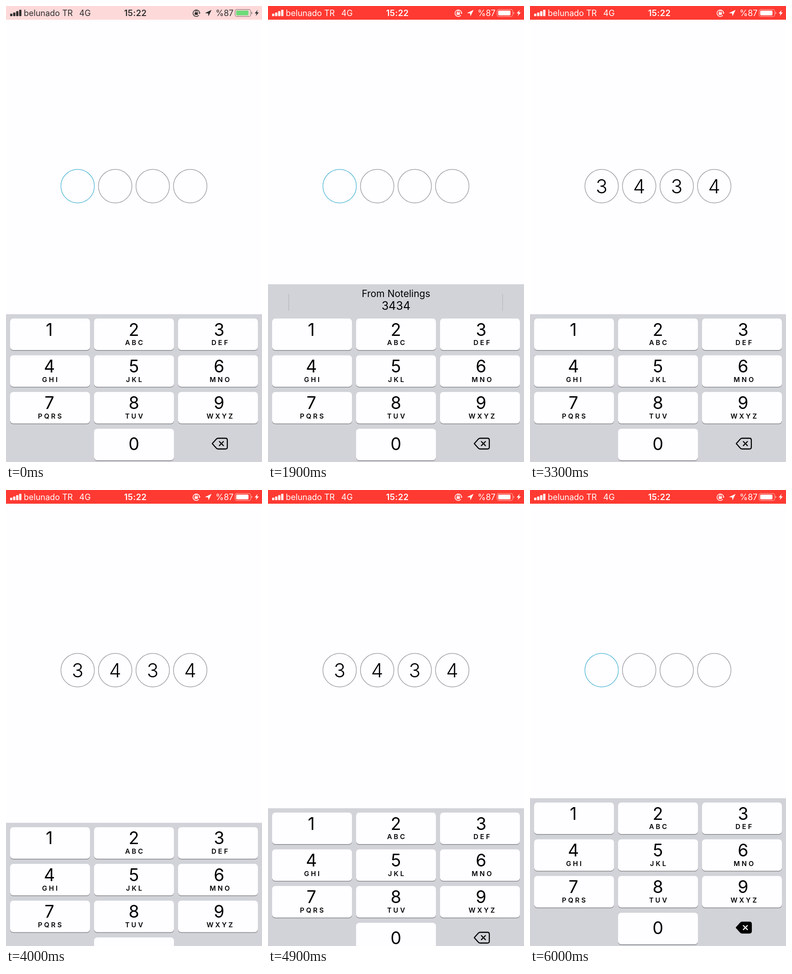
Recreate the animation shown at these times as an HTML page. Size 561x998 px, loop 6.2 s.

```html
<!DOCTYPE html>
<html lang="en">
<head>
<meta charset="utf-8">
<title>Passcode entry</title>
<style>
  html, body { margin: 0; width: 100%; height: 100%; overflow: hidden; background: #fefdff; }
  svg { display: block; width: 561px; height: 998px; font-family: Inter, Roboto, sans-serif; }
  .status text { font-size: 18px; }
  .status .clock { font-weight: 600; font-size: 18.5px; text-anchor: middle; letter-spacing: .3px; }
  .digit { font-size: 37.5px; text-anchor: middle; }
  .letters { font-size: 14.8px; font-weight: 600; letter-spacing: 3.9px; text-anchor: middle; }
  .code { font-size: 42px; font-weight: 300; text-anchor: middle; }
  .hint { text-anchor: middle; }
</style>
</head>
<body>
<svg id="stage" viewBox="0 0 561 998">
  <rect width="561" height="998" fill="#fefdff"/>
  <g id="fields"></g>
  <g id="keyboard">
    <rect y="674.5" width="561" height="324" fill="#d1d3d9"/>
    <g id="suggestion">
      <rect y="609" width="561" height="66" fill="#d1d3d9"/>
      <rect id="press" x="46" y="609" width="468" height="65" fill="#fefdff" opacity=".7"/>
      <path d="M45.5 630V667M514 630V667" stroke="#b6b8be" stroke-width="1.3"/>
      <text class="hint" x="280.5" y="637" font-size="21">From Notelings</text>
      <text class="hint" x="280.5" y="665" font-size="25">3434</text>
    </g>
    <g id="keys"></g>
    <g id="erase" stroke="#000" stroke-width="2.3" stroke-linejoin="round" stroke-linecap="round">
      <path id="eraseBody" d="M452 957.7L461.2 947.6Q462.8 946 465 946H481Q485 946 485 950V965.5Q485 969.5 481 969.5H465Q462.8 969.5 461.2 967.9Z"/>
      <path id="eraseCross" d="M467.6 953.3L476.4 962.1M476.4 953.3L467.6 962.1"/>
    </g>
  </g>
  <g id="darkStatus" class="status"></g>
  <g id="redStatus" class="status"></g>
</svg>
<script>
const $ = id => document.getElementById(id);
const LOOP = 6200, STEP = 100;
const CODE = '3434';

function statusBar(background, ink, charge) {
  const bars = [5.5, 8, 11, 14].map((h, i) =>
    `<rect x="${9 + i * 6.6}" y="${22.3 - h}" width="5" height="${h}" rx="1.3"/>`).join('');
  return `<rect width="561" height="30" fill="${background}"/>
    <g fill="${ink}">${bars}
      <text x="39" y="22">belunado TR</text>
      <text x="160.5" y="22">4G</text>
      <text class="clock" x="283.5" y="22">15:22</text>
      <text x="459.5" y="22">%87</text>
      <rect x="413.4" y="14" width="7" height="5.6" rx=".8"/>
      <path d="M421.6 14.5H426.4L424 17.6Z"/>
      <path d="M436 15.6L450.5 8.6L443.7 22.5L443 16.2Z"/>
      <path d="M538.2 12.5Q540.4 15.3 538.2 18Z"/>
      <path d="M551.5 8.5L545 16.3H549L547.3 22L554 14H549.8Z"/>
    </g>
    <g fill="none" stroke="${ink}">
      <path d="M422.6 20.3A7.2 7.2 0 1 1 424 14" stroke-width="1.5"/>
      <path d="M414.9 14V12.2A2 2 0 0 1 418.9 12.2V14" stroke-width="1.2"/>
      <rect x="502" y="7.7" width="34.3" height="15.2" rx="4" stroke-width="1.2" opacity=".55"/>
    </g>
    <rect x="504.4" y="10" width="27" height="10.6" rx="1.8" fill="${charge}"/>`;
}

function key(label, letters, col, row) {
  const x = 9 + col * 184, y = 684 + row * 80.4;
  const digitX = [95, 280.3, 467][col], lettersX = [98, 282.5, 470.3][col];
  return `<rect x="${x}" y="${y + 1.5}" width="175" height="69" rx="7" fill="#88898d"/>
    <rect x="${x}" y="${y}" width="175" height="69" rx="7" fill="#fefdff"/>
    <text class="digit" x="${digitX}" y="${y + (row === 3 ? 47 : 37.5)}">${label}</text>
    <text class="letters" x="${lettersX}" y="${y + 58.3}">${letters}</text>`;
}

$('darkStatus').innerHTML = statusBar('#fefdff', '#000', '#4cd35c');
$('redStatus').innerHTML = statusBar('#ff3a32', '#fff', '#fff');
$('keys').innerHTML = ['', 'ABC', 'DEF', 'GHI', 'JKL', 'MNO', 'PQRS', 'TUV', 'WXYZ']
  .map((letters, i) => key(i + 1, letters, i % 3, Math.floor(i / 3))).join('') + key(0, '', 1, 3);
$('fields').innerHTML = [...CODE].map((digit, i) => {
  const x = 157 + i * 82.25;
  return `<circle cx="${x}" cy="394.3" r="36.7" fill="none" stroke-width="1.5"/>
    <text class="code" x="${x}" y="410">${digit}</text>`;
}).join('');

const rings = [...document.querySelectorAll('#fields circle')];
const digits = [...document.querySelectorAll('#fields text')];
const show = (node, on) => node.setAttribute('visibility', on ? 'visible' : 'hidden');
const between = (t, from, to) => t >= from && t < to;

// Share of the way still to go for a critically damped spring.
function springLeft(ms) {
  const p = Math.max(0, ms) * 0.01826;
  return (1 + p) * Math.exp(-p);
}

function keyboardOffset(t) {
  if (t < 4000 || t >= 5200) return 0;
  if (t < 4400) return 324 * (1 - springLeft(t - 3960));
  if (t < 4700) return 326;
  return Math.round(324 * springLeft(t - 4660));
}

// Digits arrive together; each delete press removes the last one.
function digitCount(t) {
  if (t < 3300) return 0;
  if (t < 5400) return CODE.length;
  return Math.max(0, 3 - Math.floor((t - 5400) / 200));
}

function draw(t) {
  const count = digitCount(t);
  rings.forEach((ring, i) => ring.setAttribute('stroke', i === count ? '#62bfd8' : '#a5a4aa'));
  digits.forEach((digit, i) => show(digit, i < count));

  $('redStatus').setAttribute('opacity', [0.18, 0.52, 0.86][t / STEP] ?? 1);
  $('keyboard').setAttribute('transform', `translate(0 ${keyboardOffset(t)})`);
  $('suggestion').setAttribute('display', between(t, 1900, 3300) ? 'inline' : 'none');
  $('press').setAttribute('display', between(t, 2800, 3000) ? 'inline' : 'none');

  const erasing = t >= 5400 && (t - 5400) % 200 < 100 || t >= 6000;
  $('eraseBody').setAttribute('fill', erasing ? '#000' : 'none');
  $('eraseCross').setAttribute('stroke', erasing ? '#fefdff' : '#000');
}

const start = performance.now();
function tick() {
  const t = (performance.now() - start) % LOOP;
  draw(Math.floor(t / STEP) * STEP);
  requestAnimationFrame(tick);
}
tick();
</script>
</body>
</html>
```
